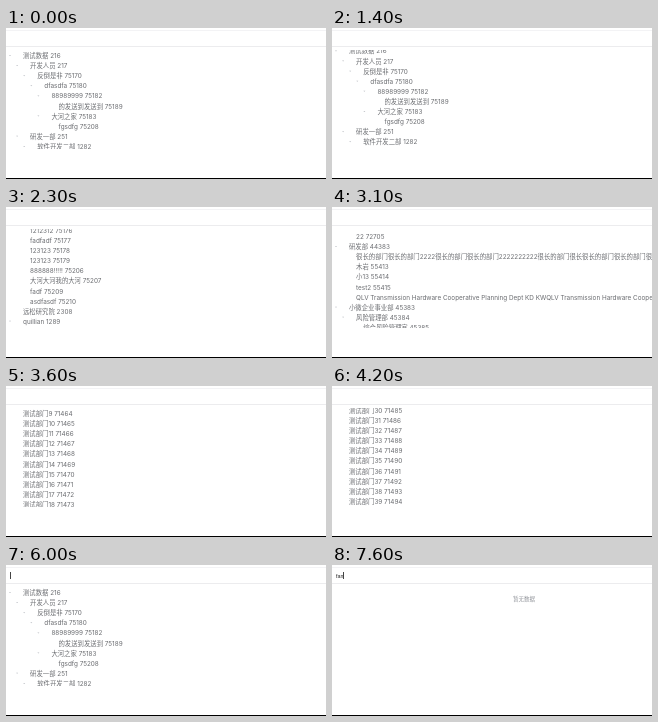
An HTML page that plays this animation: 320 by 151 pixels, repeating every 8 s.

```html
<!DOCTYPE html>
<html>
<head>
<meta charset="utf-8">
<style>
html, body { margin: 0; width: 100%; height: 100%; overflow: hidden; background: #000; }
#win {
  position: absolute; left: 0; top: 0; width: 320px; height: 150px;
  overflow: hidden; background: #fff;
  font: 6.37px/10.1px Inter, "Noto Sans CJK SC", "Noto Sans CJK", sans-serif;
  color: #6a6c70; white-space: pre;
}
#win div { position: absolute; }
#field { left: 0; top: 2px; width: 320px; height: 15px; border: solid #ececee; border-width: 1px 0; border-top-color: #f3f3f5; }
#query { left: 4px; top: 5.5px; color: #222; font: 5.3px/10px "Liberation Sans", Arial, sans-serif; }
#caret { top: 7px; width: 1px; height: 7px; background: #444; }
#list { left: 0; top: 22px; width: 320px; height: 98.5px; overflow: hidden; }
#empty { left: 181px; top: 29px; font-size: 5.5px; color: #909399; }
.row { left: 0; height: 10.1px; }
.row i {
  position: absolute; left: -14px; top: 4.2px;
  border: solid transparent; border-width: 1.5px 1.2px 0; border-top-color: #b4b7bd;
}
</style>
</head>
<body>
<div id="win">
  <div id="field"></div>
  <div id="query"></div>
  <div id="caret"></div>
  <div id="list"></div>
  <div id="empty">暂无数据</div>
</div>
<script>
const LOOP = 8000, PITCH = 10.1, VISIBLE = 10;
const $ = id => document.getElementById(id);
const show = (el, on) => el.style.display = on ? '' : 'none';
const series = (n, make) => Array.from({ length: n }, (_, i) => make(i + 1));
const long = '很长的部门', dept = 'QLV Transmission Hardware Cooperative Planning Dept';

// Each entry: depth, "+" for an expandable node, label.
const rows = [
  '0+测试数据 216', '1+开发人员 217', '2+反倒是非 75170', '3+dfasdfa 75180',
  '4+88989999 75182', '5 的发送到发送到 75189', '4+大河之家 75183', '5 fgsdfg 75208',
  '1+研发一部 251', '2+软件开发二部 1282',
  ...series(9, n => `3 开发小组${n} ${1282 + n}`),
  '1 ' + long.repeat(11) + ' 72690',
  ...series(10, n => `1 测试小组${n} ${72705 + n}`),
  '1 系昵部门1001 72721', '1 系昵部门1002 72722', '1 测试交接部门 74977',
  '1 1212121212 75169', '1 4545454545 75171', '1 122132 75174', '1 123123 75175',
  '1 1212312 75176', '1 fadfadf 75177', '1 123123 75178', '1 123123 75179',
  '1 888888!!!!! 75206', '1 大河大河我的大河 75207', '1 fadf 75209', '1 asdfasdf 75210',
  '0 远松研究院 2308', '0+quillian 1289',
  ...series(15, n => `1 业务小组${n} ${72689 + n}`),
  '1 22 72705', '0+研发部 44383',
  `1 ${long.repeat(2)}2222${long.repeat(2)}2222222222${long}很长${long.repeat(3)}的部门 55412`,
  '1 木岩 55413', '1 小13 55414', '1 test2 55415', `1 ${dept} KD KW${dept} 55416`,
  '0+小微企业事业部 45383', '1+风险管理部 45384', '2 综合风险管理室 45385',
  ...series(8, n => `2 风险小组${n} ${45385 + n}`),
  ...series(45, n => `0 测试部门${n} ${71455 + n}`)
];

// Scroll position in rows: [ms, position]
const path = [
  [0, 0], [1300, 0], [1400, .45], [1500, 2.6], [1800, 15.3], [2300, 37.4],
  [2700, 48], [3100, 61.8], [3600, 88], [4000, 107.5], [4100, 108.8],
  [4200, 109.3], [4300, 109.5], [4400, 109.5], [4500, 105], [4700, 82],
  [5000, 30.47], [5100, 9.3], [5200, 0], [LOOP, 0]
];

function scrollAt(t) {
  const k = path.findIndex(p => p[0] > t);
  const [t0, a] = path[k - 1], [t1, b] = path[k];
  return a + (b - a) * (t - t0) / (t1 - t0);
}

const pool = series(VISIBLE, () => {
  const el = document.createElement('div');
  el.className = 'row';
  el.innerHTML = '<i></i><span></span>';
  return $('list').appendChild(el);
});

function drawList(pos) {
  const first = Math.floor(pos + .25);
  pool.forEach((el, k) => {
    const row = rows[first + k];
    el.style.transform = `translate(${17 + 7.1 * row[0]}px, ${1 + (first + k - pos) * PITCH}px)`;
    show(el.firstChild, row[1] === '+');
    el.lastChild.textContent = row.slice(2);
  });
}

function draw(t) {
  const typed = t < 7400 ? 0 : Math.min(3, Math.floor((t - 7400) / 100) + 1);
  const done = typed === 3;
  $('query').textContent = 'fan'.slice(0, typed);
  $('caret').style.left = [4, 5, 8, 11][typed] + 'px';
  show($('caret'), t >= 7000 || (t >= 6000 && t < 6500));
  show($('list'), !done);
  show($('empty'), done);
  if (!done) drawList(scrollAt(t));
}

let last = -1;
function tick() {
  const t = Math.floor(performance.now() % LOOP / 100) * 100;
  if (t !== last) draw(last = t);
  requestAnimationFrame(tick);
}
tick();
</script>
</body>
</html>
```
